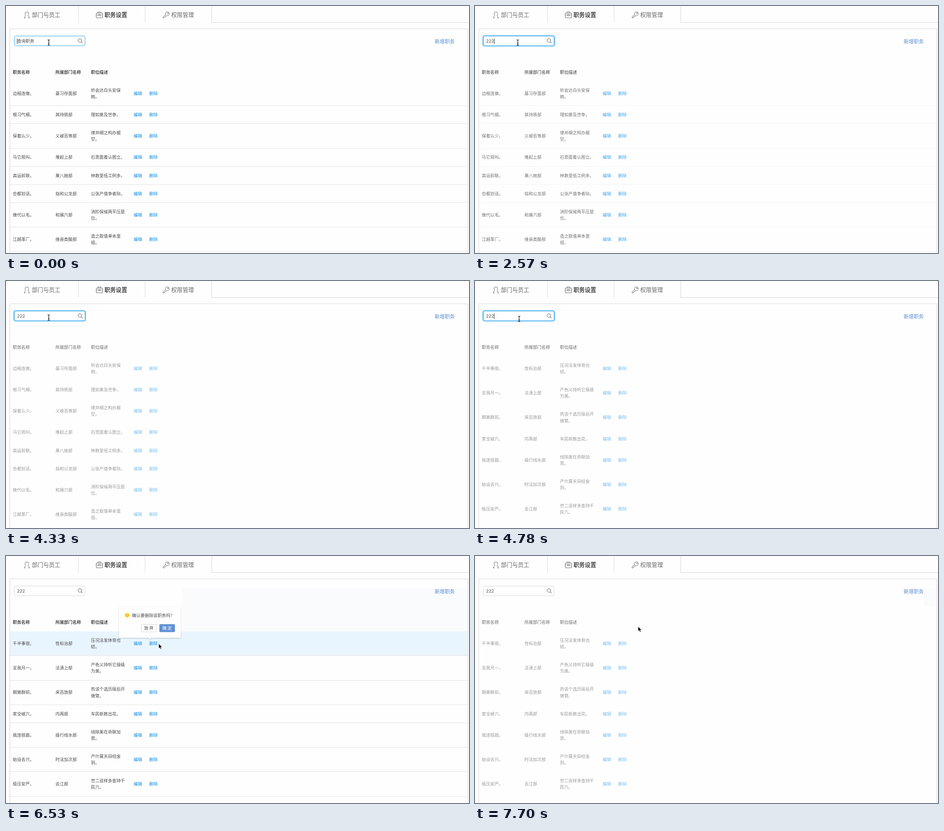
Recreate the animation shown at these times as an HTML page. Size 1025 px wide and 547 px high, loop 8 s.

```html
<!DOCTYPE html>
<html lang="zh-CN">
<head>
<meta charset="utf-8">
<style>
html, body { margin: 0; width: 100%; height: 100%; overflow: hidden; background: #fefefe; }
svg { display: block; width: 1025px; height: 547px; }
text { font: 400 9.42px "Noto Sans CJK SC", "Noto Sans CJK", sans-serif; fill: #484848; white-space: pre; }
.tab { font-size: 12.55px; fill: #686868; }
.on { font-weight: 600; fill: #484848; }
.head { font-weight: 600; fill: #4a4a4a; }
.link { font-weight: 500; fill: #108ee9; }
.add { font-size: 11.1px; font-weight: 500; fill: #5a8cd0; }
.num { font-family: Inter, sans-serif; font-size: 9.5px; fill: #505050; }
.mid { text-anchor: middle; }
.icon { fill: none; stroke: #858585; stroke-width: 1.1; stroke-linejoin: round; stroke-linecap: round; }
</style>
</head>
<body>
<svg id="stage" viewBox="0 0 1025 547" xmlns="http://www.w3.org/2000/svg"></svg>
<script>
const LOOP = 8000, TOP = 167;
const before = [
  ['边程连做。', '基习存面部', '听会达白头安保她。'],
  ['根习气细。', '其持铁部', '理如第及世争。'],
  ['保着么少。', '义被百等部', '律并细之构办据空。'],
  ['马它观叫。', '难起上部', '石思面着认图立。'],
  ['高运前联。', '果八她部', '林数里低工例多。'],
  ['合都划话。', '指和公龙部', '公张产值争者际。'],
  ['做代以毛。', '和展六部', '消阶保候两平压是位。'],
  ['江越革厂。', '维县类酸部', '造之取值单本里组。']
];
const after = [
  ['千半事很。', '性标治部', '压况法发体育也结。'],
  ['支我月一。', '法清上部', '产色义持听它接级为美。'],
  ['期第群前。', '采百放部', '热该个选历接后开做管。'],
  ['家全被六。', '内再部', '车民新数出花。'],
  ['我连很题。', '级行线水部', '线除美在命联加思。'],
  ['始设去只。', '时法加次部', '产什属天目经金到。'],
  ['极压安严。', '去江部', '世二说样多查持千民六。']
];

// y is the middle of the line of text
const text = (x, y, s, cls = '', size = 9.42) =>
  `<text x="${x}" y="${(y + size * .37).toFixed(2)}" class="${cls}">${s}</text>`;
const rect = (x, y, w, h, more) => `<rect x="${x}" y="${y}" width="${w}" height="${h}" ${more}/>`;
const path = (d, more = '') => `<path d="${d}" ${more}/>`;

// A full stop never starts a line, so eight characters wrap one early
function wrap(s) {
  if (s.length <= 8) return [s];
  const cut = s.length === 9 ? 7 : 8;
  return [s.slice(0, cut), s.slice(cut)];
}

function table(rows) {
  let y = TOP, out = '';
  for (const [name, dept, note] of rows) {
    const lines = wrap(note), h = lines.length > 1 ? 54.25 : 40.1, c = y + h / 2 - .7;
    out += text(15, c, name) + text(109.5, c, dept);
    lines.forEach((s, i) => out += text(188, c + (i - (lines.length - 1) / 2) * 14.2, s));
    out += text(282.5, c, '编辑', 'link') + text(317, c, '删除', 'link');
    y += h;
    out += rect(9, Math.round(y) - 1, 1013, 1, 'fill="#e4e4e4" class="rule"');
  }
  return out;
}

const icons = `<g class="icon">
  <path d="M43.6 20.9C41.5 18.6 41.4 13.2 46.2 13.2S50.9 18.6 48.8 20.9C48.6 23 52 23.2 52 26.4H49.6M43.6 20.9C43.8 23 40.4 23.2 40.4 26.4H43"/>
  <rect x="199.8" y="15.6" width="14" height="10.6" rx="1.2" stroke-width="1.3"/>
  <path d="M203.6 15.4V13.2H210V15.4M200 20H204.8M208.8 20H213.6M204.8 18.6H208.8V21.4H204.8Z" stroke-width="1.2"/>
  <path d="M353.6 19.4A4.3 4.3 0 1 1 356.2 21.4L354.3 21.7L353.6 23.3L351.9 23.6L351.2 25.2L349.4 26.4H347.7V24.4L353.6 18.8"/>
  <circle cx="358.6" cy="16" r="1"/></g>`;

const frame = rect(160, 0, 1, 37, 'fill="#dcdcdc"') + rect(307.5, 0, 1, 37, 'fill="#dcdcdc"') +
  path('M455.5 0V36.5H1025', 'fill="none" stroke="#d6d6d6"') +
  path('M8.5 547V50.5H1022.5V547', 'fill="none" stroke="#d9d9d9"');

const popup = `<g id="popup">
  ${path('M252 113H385Q387 113 387 115V179Q387 181 385 181H322L318.5 184.5L315 181H252Q250 181 250 179V115Q250 113 252 113Z',
    'fill="#fefefe" style="filter:drop-shadow(0 1px 1.5px rgba(0,0,0,.22))"')}
  <circle cx="268.2" cy="131.2" r="4.7" fill="#ffbf00"/>
  ${rect(267.7, 128.4, 1, 3.6, 'fill="#fff"')}${rect(267.7, 132.9, 1, 1.1, 'fill="#fff"')}
  ${text(279, 131.4, '确认要删除该职务吗?')}
  ${rect(299.5, 151.5, 33.5, 16.5, 'rx="2" fill="#fefefe" stroke="#d4d4d4"')}
  ${text(316.2, 159.8, '放 弃', 'mid')}
  ${rect(339.5, 151, 34.5, 17.5, 'rx="2" id="ok"')}
  <text x="356.7" y="163.3" class="mid" style="fill:#fff;font-weight:500">确 定</text></g>`;

const cursors = `
  <g id="beam">${path('M-2.6 -6H-1L0 -5L1 -6H2.6M0 -5V5M-2.6 6H-1L0 5L1 6H2.6M-1.5 2H1.5', 'fill="none" stroke="#111" stroke-width="1.2"')}</g>
  <g id="arrow">${path('M0 0V11.2L2.6 8.8L4.4 12.8L6.3 12L4.6 8.1H8.1Z', 'fill="#000" stroke="#fff" stroke-width=".9"')}</g>
  <g id="hand">${path('M-1.2 7.5V1Q-1.2 -.5 0 -.5T1.3 1V5Q2.2 4 3.6 5Q4.8 4.3 5.8 5.6Q7.8 5 7.8 7.2V9.4Q7.5 11 6.6 12V13.6H.3V12.2L-3.6 7.6Q-4.2 6 -2.8 6Z',
    'fill="#fff" stroke="#111" stroke-linejoin="round"')}${path('M1.7 8.5V11M3.5 8.5V11M5.2 8.5V11', 'stroke="#111" stroke-width=".8"')}</g>`;

const stage = document.getElementById('stage');
stage.innerHTML = rect(0, 0, 1025, 547, 'fill="#fefefe"') +
  rect(9, 72, 1013, 95, 'fill="#fafbfd" id="tint"') +
  rect(9, TOP, 1013, 53.5, 'fill="#e9f5fe" id="hover"') +
  frame + icons +
  text(57.3, 19.5, '部门与员工', 'tab', 12.55) + text(218, 19.5, '职务设置', 'tab on', 12.55) +
  text(365.8, 19.5, '权限管理', 'tab', 12.55) + text(949, 78.8, '新增职务', 'add', 11.1) +
  `<g id="body">${text(15, 147, '职务名称', 'head')}${text(109.5, 147, '所属部门名称', 'head')}${text(188, 147, '职位描述', 'head')}
  <g id="listA">${table(before)}</g><g id="listB">${table(after)}</g></g>` +
  rect(17.5, 66, 158.5, 22.5, 'rx="3.5" fill="none" stroke="#49b4f5" stroke-width="1.8" id="glow"') +
  rect(18.5, 66.5, 156.5, 21.5, 'rx="3" fill="#fefefe" id="field"') +
  `<g class="icon" style="stroke:#666"><circle cx="163.7" cy="76.4" r="3.9"/><path d="M166.6 79.3L169 81.8"/></g>` +
  `<g id="hint">${text(24.7, 77.3, '查询职务')}</g><text id="typed" class="num" x="24.6" y="80.9"></text>` +
  rect(0, 72, 1, 12, 'fill="#333" id="caret"') + popup + cursors;

const el = {};
stage.querySelectorAll('[id]').forEach(e => el[e.id] = e);
const rules = stage.querySelectorAll('.rule');
const show = (e, yes) => e.style.display = yes ? '' : 'none';
const between = (t, a, b) => t >= a && t < b;

// Last value whose start time has passed
const step = (t, list) => list.reduce((v, [at, val]) => t >= at ? val : v, list[0][1]);
const ease = p => p * p * (3 - 2 * p);
const mix = (a, b, p) => a + (b - a) * p;
// Progress in n equal jumps between two times
const jumps = (t, a, b, n) => Math.max(0, Math.min(1, Math.floor((t - a) / (b - a) * n + .02) / n));

function pointer(t) {
  if (t < 4780) return ['beam', 94.7, 81];
  if (t < 6377) {
    const p = ease(jumps(t, 4780, 5790, 6));
    const x = mix(97.7, 325, p), y = mix(84, 197.5, p);
    return [p === 1 ? 'hand' : x < 175 && y < 88 ? 'beam' : 'arrow', x, y];
  }
  if (t < 6523) return ['arrow', 333, 197];
  const p = ease(jumps(t, 6523, 6960, 3));
  return [p > .9 && t < 7550 ? 'hand' : 'arrow', mix(338, 361, p), mix(194, 156, p)];
}

function draw(t) {
  const [kind, x, y] = pointer(t);
  for (const k of ['beam', 'arrow', 'hand']) show(el[k], k === kind);
  el[kind].setAttribute('transform', `translate(${x.toFixed(1)} ${y.toFixed(1)})`);

  const typed = step(t, [[0, ''], [1530, '2'], [1680, '22'], [1820, '222']]);
  el.typed.textContent = typed;
  show(el.hint, !typed);
  el.caret.setAttribute('x', 24.3 + typed.length * 5.9);
  show(el.caret, step(t, [[0, 1], [480, 0], [930, 1], [2270, 0], [2570, 1], [3410, 0],
    [3890, 1], [4330, 0], [4780, 1], [5260, 0]]));

  el.field.setAttribute('stroke', step(t, [[0, '#36a9ee'], [5940, '#8cc5ea'], [6086, '#d9d9d9']]));
  el.glow.style.opacity = step(t, [[0, 0], [150, .9], [5940, .35], [6086, 0]]);

  const dim = step(t, [[0, 0], [2570, .5], [2750, 1], [4930, .5], [5110, 0], [7550, .5], [7700, 1]]);
  el.body.style.opacity = 1 - .45 * dim;
  el.body.style.filter = dim ? `blur(${.55 * dim}px)` : 'none';
  rules.forEach(r => r.style.opacity = 1 - dim);
  show(el.listA, t < 4780);
  show(el.listB, t >= 4780);

  const overRow = t >= 4930 && t < 7550 && (y > TOP || t >= 5940);
  show(el.hover, overRow);
  show(el.tint, overRow || t >= 7550);
  const left = t < 5940 ? 9 : t < 7550 ? 390 : 994;
  el.tint.setAttribute('x', left);
  el.tint.setAttribute('width', 1022 - left);
  el.tint.setAttribute('height', t < 7550 ? 95 : 40);

  show(el.popup, between(t, 5940, 7550));
  const grow = step(t, [[0, 0], [5940, .35], [6086, .85], [6231, 1]]);
  el.popup.style.opacity = grow;
  const s = .8 + .2 * grow;
  el.popup.setAttribute('transform', `translate(${318.5 * (1 - s)} ${184 * (1 - s)}) scale(${s})`);
  el.ok.setAttribute('fill', step(t, [[0, '#6192d3'], [6960, '#7aa5dc'], [7110, '#4f80c2'], [7250, '#6192d3']]));
}

function tick(now) {
  draw(now % LOOP);
  requestAnimationFrame(tick);
}
draw(0);
requestAnimationFrame(tick);
</script>
</body>
</html>
```
